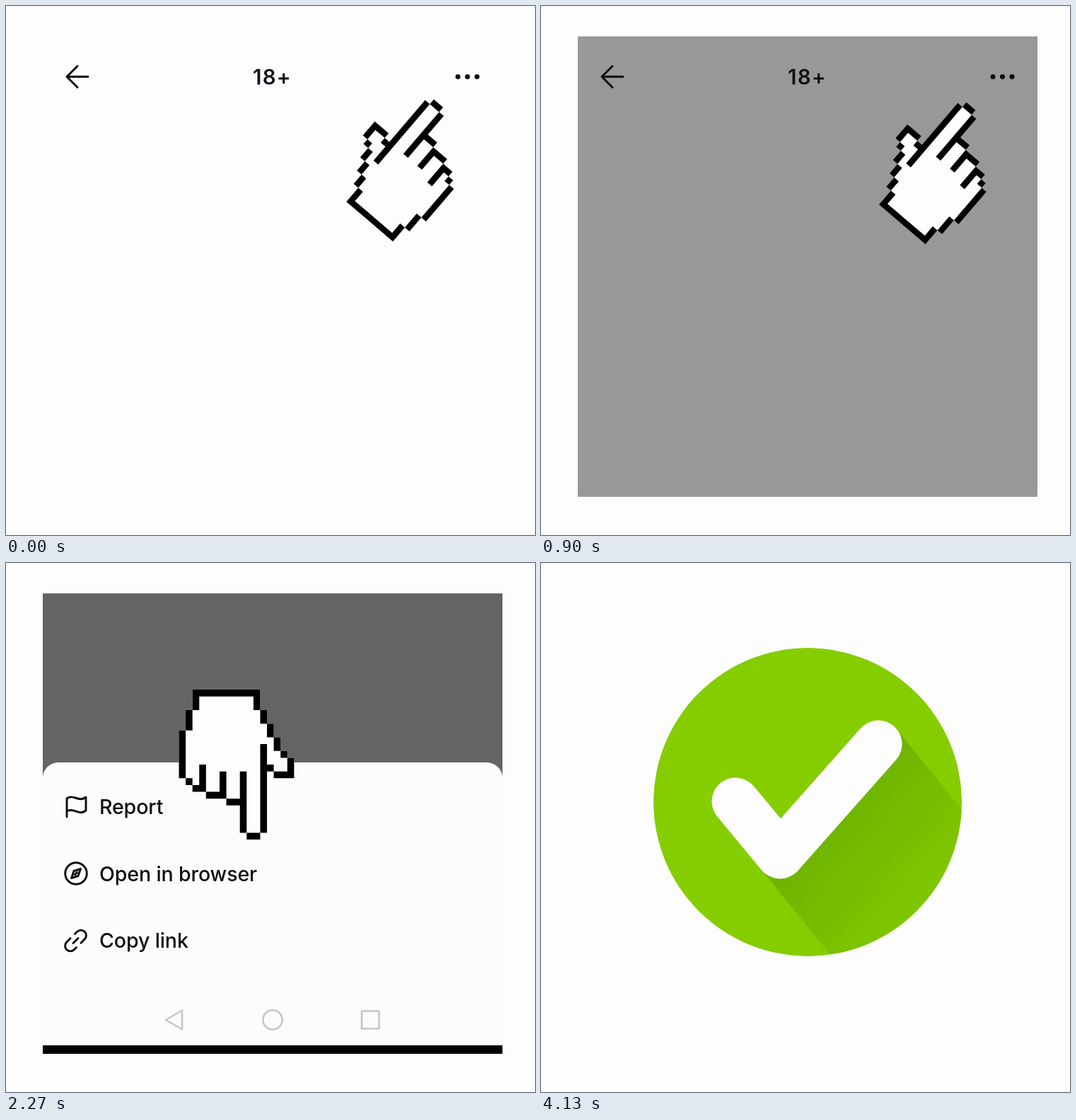
Animation, 748 px wide and 748 px high, one loop 4.16 s. Source, as an HTML page:

```html
<!DOCTYPE html>
<html lang="en">
<head>
<meta charset="utf-8">
<title>Open in browser</title>
<style>
  html, body { margin: 0; width: 100%; height: 100%; overflow: hidden; background: #fdfdfd; }
  svg { display: block; width: 100%; height: 100%; }
  text { font: 500 28.5px Inter, sans-serif; letter-spacing: -.1px; fill: #0c0c0c; }
  .title { font-weight: 600; font-size: 29.5px; letter-spacing: 1.2px; font-feature-settings: "calt" 0; fill: #111118; }
  .line { fill: none; stroke: #0c0c0e; stroke-width: 2.9; stroke-linecap: round; stroke-linejoin: round; }
  .nav { fill: none; stroke: #c6c6c8; stroke-width: 2.6; stroke-linejoin: round; }
</style>
</head>
<body>
<svg viewBox="0 0 748 748">
  <defs>
    <g id="hand">
      <path fill="#fdfdfd" d="M2 0H12V3H13V5H14V7H15V9H16V10H17V13H14V12H13V21H12V22H10V21H9V17H7V16H4V15H2V14H1V13H0V6H1V3H2Z"/>
      <path id="ink"/>
    </g>
    <clipPath id="frame"><rect x="52" y="43" width="650" height="651"/></clipPath>
    <clipPath id="disc"><circle cx="377" cy="338" r="218"/></clipPath>
    <linearGradient id="shade" gradientUnits="userSpaceOnUse" x1="420" y1="350" x2="560" y2="475">
      <stop stop-color="#6fb400"/><stop offset="1" stop-color="#80c800"/>
    </linearGradient>
  </defs>

  <rect id="card" x="52" y="43" width="650" height="651"/>

  <g id="header">
    <path class="line" d="M116 100H86M101 85L86 100L101 115"/>
    <text class="title" x="376.5" y="111" text-anchor="middle">18+</text>
    <g fill="#0c0c0e">
      <circle cx="639" cy="100" r="3.5"/><circle cx="652.5" cy="100" r="3.5"/><circle cx="666" cy="100" r="3.5"/>
    </g>
    <use id="pointUp" href="#hand"/>
  </g>

  <g id="menu" clip-path="url(#frame)">
    <g id="sheet">
      <rect x="52" y="282" width="650" height="500" rx="22" fill="#fcfbfd"/>
      <rect id="pressed" x="52" y="392" width="650" height="95" fill="#e6e4eb"/>
      <path class="line" d="M86 359V333C95 326 103 339 113 331V350C103 358 95 345 86 351"/>
      <circle class="line" cx="99" cy="439" r="15.3"/>
      <path class="line" d="M105.5 432.5L102 442.5L92.5 445.5L96 435.5ZM97.5 440.5L100.5 437.5"/>
      <path class="line" transform="translate(98.5 534) rotate(-45)"
        d="M-6 7.5H-10.5A7.5 7.5 0 0 1 -10.5 -7.5H-3M6 -7.5H10.5A7.5 7.5 0 0 1 10.5 7.5H3M-5 0H5"/>
      <text x="132" y="355">Report</text>
      <text x="132" y="449.5">Open in browser</text>
      <text x="132" y="544">Copy link</text>
    </g>
    <rect x="52" y="605" width="650" height="77" fill="#fcfbfd"/>
    <path class="nav" d="M226 646L249 632.5V659.5ZM503 633.5H527.5V658.5H503Z"/>
    <circle class="nav" cx="377" cy="646" r="13.7"/>
    <rect x="52" y="682" width="650" height="12"/>
    <circle id="touch" cx="366" cy="450" r="20" fill="#f5f4f9" fill-opacity=".9" stroke="#d6d2e6" stroke-width="2"/>
    <use id="pointDown" href="#hand"/>
  </g>

  <g id="done">
    <g clip-path="url(#disc)">
      <circle cx="377" cy="338" r="218" fill="#86cd00"/>
      <path fill="url(#shade)" d="M503 235L312 434L501 667L692 468Z"/>
    </g>
    <path d="M275 337L338 413L477 256" fill="none" stroke="#fdfdfd" stroke-width="67" stroke-linecap="round" stroke-linejoin="round"/>
  </g>
</svg>
<script>
const LOOP = 4160, MENU = 1630, HAND = 2000, PRESS = 2900, BLANK = 3300, DONE = 3470, PEAK = 3950;
const el = id => document.getElementById(id);
const ramp = (t, from, to) => Math.min(1, Math.max(0, (t - from) / (to - from)));
const show = (id, on) => { el(id).style.display = on ? "" : "none"; };
const move = (id, value) => el(id).setAttribute("transform", value);

// Outline cells of the pixel hand: column, row, width, height.
const cells = [
  [2,0,10,1], [2,1,1,2], [11,1,1,2], [1,3,1,3], [12,3,1,2], [13,5,1,2], [14,7,1,2], [15,9,1,1],
  [16,10,1,3], [14,12,2,1], [13,11,1,1], [12,8,1,13], [10,21,2,1], [9,12,1,9], [7,16,2,1],
  [6,12,1,4], [4,15,2,1], [3,11,1,4], [2,14,1,1], [1,13,1,1], [0,6,1,7]
];
el("ink").setAttribute("d", cells.map(([x, y, w, h]) => `M${x} ${y}h${w}v${h}h${-w}z`).join(""));

function draw(t) {
  const inMenu = t >= MENU && t < BLANK;
  show("card", t < BLANK);
  show("header", t < MENU);
  show("menu", inMenu);
  show("done", t >= DONE);

  const dim = t < MENU ? ramp(t, 516, 1100) : ramp(t, MENU, MENU + 280);
  const gray = Math.round(253 - 153 * dim);
  el("card").setAttribute("fill", `rgb(${gray},${gray},${gray})`);

  // Both hands share one bob along their pointing direction.
  const bob = 5.5 + 12 * Math.cos(2 * Math.PI * (t / 1000 - .326));
  move("pointUp", `translate(${547 + .649 * bob} ${333 - .76 * bob}) rotate(220.5) scale(8.65) translate(-2 0)`);
  move("pointDown", `translate(244.5 ${162.2 + bob}) scale(9.58 9.64)`);
  show("pointDown", t >= HAND);

  move("sheet", `translate(0 ${412 * (1 - ramp(t, MENU, MENU + 270)) ** 3})`);
  const press = ramp(t, PRESS, PRESS + 120);
  el("pressed").style.opacity = press;
  el("touch").style.opacity = press;

  const grow = 1.13 * (1 - (1 - ramp(t, DONE, PEAK)) ** 3);
  const settle = ramp(t, PEAK, 4130);
  const scale = grow - .13 * settle * settle * (3 - 2 * settle);
  move("done", `translate(377 338) scale(${scale}) translate(-377 -338)`);
}

const start = performance.now();
function tick() {
  draw((performance.now() - start) % LOOP);
  requestAnimationFrame(tick);
}
tick();
</script>
</body>
</html>
```
